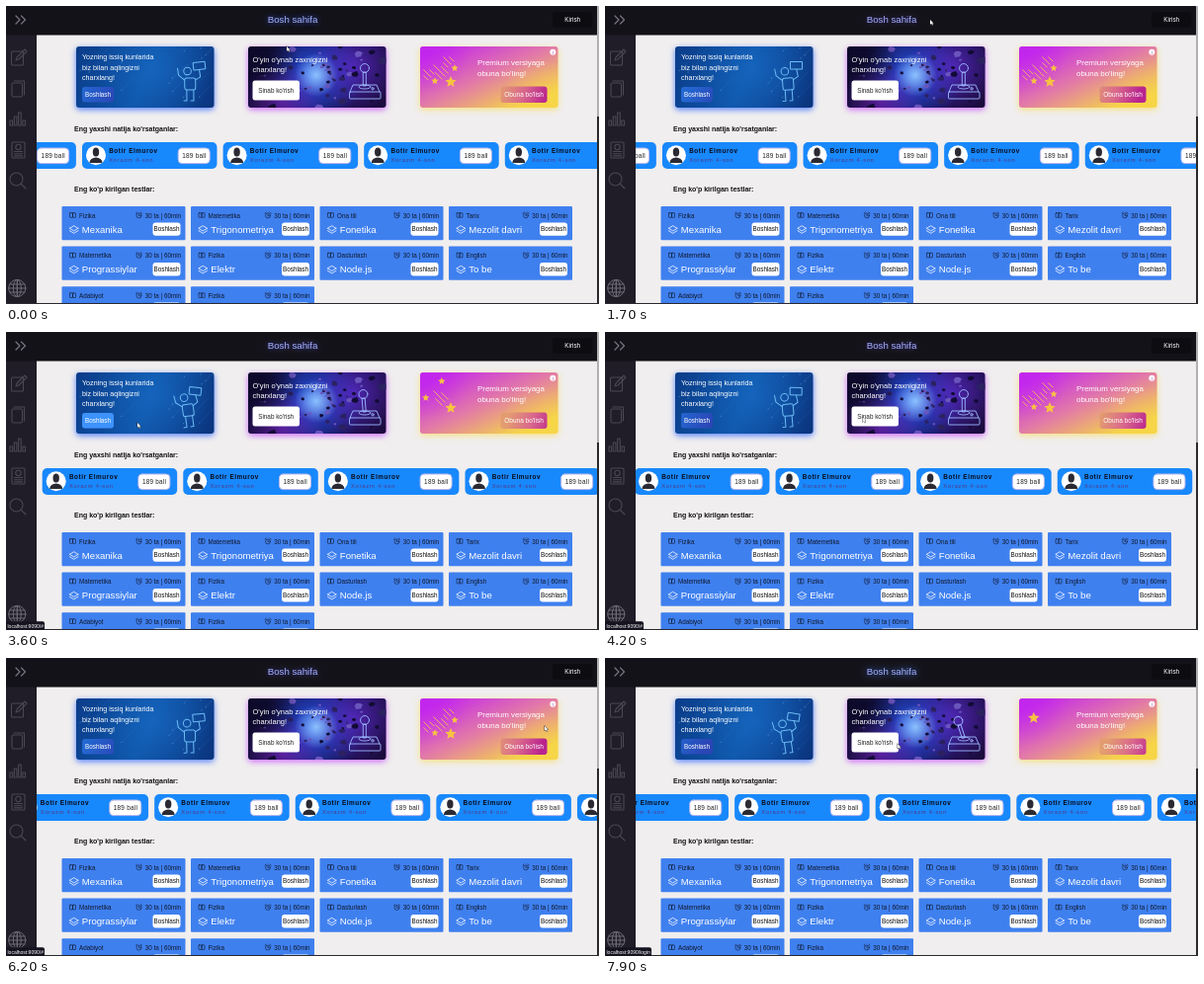
An HTML page with a canvas for the animation above (8000 ms loop, 600 by 302 pixels).

```html
<!DOCTYPE html>
<html lang="uz">
<head>
<meta charset="utf-8">
<title>Bosh sahifa</title>
<style>
html, body { margin: 0; width: 100%; height: 100%; overflow: hidden; background: #f0eeee; }
canvas { display: block; width: 600px; height: 302px; }
</style>
</head>
<body>
<canvas id="stage"></canvas>
<script>
const W = 600, H = 302, LOOP = 8000, STEP = 100, TAU = Math.PI * 2;
const SANS = '"Liberation Sans", Arial, sans-serif';
const dpr = window.devicePixelRatio || 1;
let g;

function surface(canvas) {
  canvas.width = W * dpr;
  canvas.height = H * dpr;
  const c = canvas.getContext('2d');
  c.scale(dpr, dpr);
  c.lineJoin = c.lineCap = 'round';
  return c;
}

// ---------- helpers ----------
const clamp = v => Math.max(0, Math.min(1, v));
const ease = v => { v = clamp(v); return v * v * (3 - 2 * v); };
const mix = (a, b, k) => a + (b - a) * k;
const wave = (t, peak, period) => Math.cos((t - peak) / period * TAU);
const during = (t, from, to) => t >= from && t < to;

function random(seed) {
  return () => (seed = (seed * 16807) % 2147483647) / 2147483647;
}

function pen(color, width) {
  g.strokeStyle = color;
  g.lineWidth = width;
}

function box(x, y, w, h, r, fill) {
  g.beginPath();
  g.roundRect(x, y, w, h, r);
  if (!fill) return g.stroke();
  g.fillStyle = fill;
  g.fill();
}

function oval(x, y, rx, ry, fill) {
  g.beginPath();
  g.ellipse(x, y, rx, ry, 0, 0, TAU);
  if (!fill) return g.stroke();
  g.fillStyle = fill;
  g.fill();
}

const circle = (x, y, r, fill) => oval(x, y, r, r, fill);

function path(...p) {
  g.beginPath();
  for (let i = 0; i < p.length; i += 2) g.lineTo(p[i], p[i + 1]);
  g.stroke();
}

// chevron centred on x, y; w and h may be negative to turn it
function vee(x, y, w, h) {
  path(x - w, y, x, y + h, x + w, y);
}

function text(s, x, y, size, color, opt = {}) {
  g.font = `${opt.bold ? 'bold ' : ''}${size}px ${SANS}`;
  g.textAlign = opt.align || 'left';
  g.letterSpacing = (opt.gap || 0) + 'px';
  g.fillStyle = color;
  g.fillText(s, x, y);
}

const label = (s, x, y, size, color) => text(s, x, y, size, color, { align: 'center' });

function lines(list, x, y, size, step) {
  list.forEach((s, i) => text(s, x, y + i * step, size, '#fff'));
}

function ramp(x, y, w, h, ...colors) {
  const r = g.createLinearGradient(x, y, x + w, y + h);
  colors.forEach((c, i) => r.addColorStop(i / (colors.length - 1), c));
  return r;
}

function glow(x, y, r, rgb, alpha) {
  const s = g.createRadialGradient(x, y, 0, x, y, r);
  s.addColorStop(0, `rgba(${rgb},${alpha})`);
  s.addColorStop(1, `rgba(${rgb},0)`);
  g.fillStyle = s;
  g.fillRect(x - r, y - r, r * 2, r * 2);
}

function at(x, y, angle, paint) {
  g.save();
  g.translate(x, y);
  g.rotate(angle);
  paint();
  g.restore();
}

// ---------- fixed page parts ----------
function banner(x, shade, fill, decorate) {
  g.save();
  g.shadowColor = shade;
  g.shadowBlur = 6 * dpr;
  g.shadowOffsetY = 2 * dpr;
  box(x, 41, 139.5, 62, 3, fill);
  g.restore();
  g.save();
  g.clip();
  decorate();
  g.restore();
}

function circuits() {
  const rnd = random(41);
  glow(150, 65, 60, '28,115,210', .5);
  pen('rgba(90,170,250,.2)', .5);
  for (let i = 0; i < 14; i++) {
    const x = 75 + rnd() * 130, y = 42 + rnd() * 60, d = 8 + rnd() * 18;
    path(x, y, x + d, y - d);
    circle(x, y, .7, 'rgba(120,190,255,.35)');
  }
}

function space() {
  const rnd = random(97);
  glow(310, 70, 52, '38,85,240', .95);
  glow(352, 62, 45, '100,45,215', .7);
  glow(280, 98, 42, '130,35,190', .6);
  glow(314, 70, 22, '150,205,255', .9);
  for (let i = 0; i < 55; i++) {
    const a = rnd() * TAU, d = 12 + rnd() * 65, r = 1 + d / 16 * rnd();
    g.fillStyle = ['#120b35', '#2b2160', '#6a55bd'][i % 3];
    g.beginPath();
    for (let n = 0; n < TAU; n += TAU / 6) {
      const m = r * (.6 + rnd() * .5);
      g.lineTo(314 + Math.cos(a) * d + Math.cos(n) * m * 1.3, 70 + Math.sin(a) * d * .6 + Math.sin(n) * m);
    }
    g.fill();
  }
  glow(262, 54, 34, '12,8,40', .75);
}

function sunset() {
  glow(425, 45, 45, '190,30,245', .5);
  glow(545, 105, 50, '250,215,65', .5);
}

function sidebar() {
  pen('#77747f', 1.2);
  for (const x of [14, 19.5]) path(x - 4, 10, x, 14, x - 4, 18);
  pen('#4a4754', 1.1);
  box(5.5, 46, 12, 14, 1);
  path(10, 55, 11, 52, 19, 44, 21, 46, 13, 54, 10, 55);
  box(6, 78, 10.5, 14, 1.5);
  path(8, 76, 18.5, 76, 18.5, 90);
  for (let i = 0; i < 4; i++) {
    const h = 5 + 4 * (i % 3);
    box(4 + i * 4.3, 121 - h, 2.6, h, 0);
  }
  box(6, 138, 13, 16, 1);
  circle(12.5, 143, 2.7);
  for (let y = 147.5; y < 153; y += 2.2) path(8.5, y, 16.5, y);
  circle(10.5, 175.5, 6.5);
  path(15, 180, 20, 185);
  pen('#6d6a76', 1);
  for (const r of [8.6, 4, .1]) oval(11.3, 286, r, 8.6);
  for (const d of [-4, 0, 4]) path(11.3 - 8.6 + Math.abs(d) / 4, 286 + d, 11.3 + 8.6 - Math.abs(d) / 4, 286 + d);
}

function testCard(x, y, subject, title) {
  const ink = '#10182c';
  box(x, y, 125, 34.2, 1, '#3f80ef');
  pen(ink, .6);
  for (const s of [-3, 0]) box(x + 11 + s, y + 6.7, 3, 4.6, .5);
  text(subject, x + 17.5, y + 11.6, 6.3, ink);
  circle(x + 78, y + 9.4, 2.5);
  path(x + 78, y + 8, x + 78, y + 9.6, x + 79.2, y + 9.6);
  for (const s of [-1, 1]) path(x + 78 + s * 3.1, y + 7.2, x + 78 + s * 1.8, y + 6);
  text('30 ta | 60min', x + 84.3, y + 11.6, 6.3, ink);
  pen('#fff', .75);
  vee(x + 12.2, y + 22.3, 4.3, -2.6);
  vee(x + 12.2, y + 22.3, 4.3, 2.6);
  vee(x + 12.2, y + 24.7, 4.3, 2.6);
  text(title, x + 20.3, y + 26.5, 9.6, '#fff');
  box(x + 92, y + 16.4, 28, 13.4, 3, '#fff');
  label('Boshlash', x + 106, y + 25.4, 6.35, '#111');
}

const TESTS = [
  ['Fizika', 'Mexanika'], ['Matemetika', 'Trigonometriya'], ['Ona tili', 'Fonetika'], ['Tarix', 'Mezolit davri'],
  ['Matemetika', 'Prograssiylar'], ['Fizika', 'Elektr'], ['Dasturlash', 'Node.js'], ['English', 'To be'],
  ['Adabiyot', ''], ['Fizika', '']
];

function page() {
  g.fillStyle = '#f0eeee';
  g.fillRect(0, 0, W, H);
  banner(71, 'rgba(30,90,255,.75)', ramp(71, 41, 140, 62, '#0b3d8a', '#0e55a8', '#0b337c'), circuits);
  banner(245, 'rgba(190,50,255,.7)', ramp(245, 41, 140, 62, '#0d0a28', '#1a1258', '#1c0b3c'), space);
  banner(419, 'rgba(250,215,60,.6)', ramp(460, 36, 35, 78, '#c62ee6', '#e279a8', '#f4d44a'), sunset);
  lines(['Yozning issiq kunlarida', 'biz bilan aqlingizni', 'charxlang!'], 77, 54.4, 7.15, 10.4);
  lines(["O'yin o'ynab zaxnigizni", 'charxlang!'], 249.5, 56.6, 7.5, 10.6);
  lines(['Premium versiyaga', "obuna bo'ling!"], 477, 59.8, 7.95, 10.7);
  circle(553.3, 46.8, 3, '#fff');
  label('i', 553.3, 48.6, 5, '#a050c0');
  text("Eng yaxshi natija ko'rsatganlar:", 69, 126.6, 7, '#111', { bold: true });
  text("Eng ko'p kirilgan testlar:", 69, 188.4, 7, '#111', { bold: true });
  TESTS.forEach(([s, title], i) => testCard(56.5 + (i % 4) * 130.5, 203 + Math.floor(i / 4) * 40.6, s, title));
  box(0, 0, 31, H, 0, '#201d28');
  box(0, 0, W, 29.5, 0, '#131218');
  box(553, 6, 40.5, 16, 3, '#0d0c11');
  label('Kirish', 573.2, 16.4, 6.3, '#fff');
  sidebar();
  box(598, 0, 2, H, 0, '#2a2a2c');
  box(598, 0, 2, 112, 0, '#b0b0b2');
  box(0, 301, W, 1, 0, '#2b2930');
}

// ---------- moving parts ----------
function rankCard(x) {
  box(x, 138, 136.5, 27, 5, '#1888fd');
  circle(x + 14, 151.3, 10, '#fff');
  oval(x + 14, 148, 3.2, 4.6, '#2b2a33');
  g.beginPath();
  g.ellipse(x + 14, 159, 6.5, 5.5, 0, Math.PI, TAU);
  g.fill();
  text('Botir Elmurov', x + 27.2, 148.8, 6.4, '#0a0a16', { bold: true, gap: .55 });
  text('Xorazm 4-son', x + 27.2, 157.8, 5.8, '#503a83', { gap: .75 });
  box(x + 97.2, 144, 32, 15.6, 4, '#fff');
  pen('#b9b6e8', 1);
  g.stroke();
  text('189 ball', x + 101.2, 154, 6.4, '#222', { gap: .25 });
}

function ranking(t) {
  g.save();
  g.beginPath();
  g.rect(31, 130, 567, 42);
  g.clip();
  for (let i = -1; i < 5; i++) rankCard(77 - t * .0112 + i * 142.6);
  g.restore();
}

function heading(t) {
  const k = .5 + .5 * wave(t, 2900, 2500);
  const picked = during(t, 600, 1700);
  if (picked) box(264.5, 7.8, 51.3 * clamp((t - 500) / 400), 13, 0, '#2a57c4');
  g.save();
  if (!picked) {
    g.shadowColor = `rgba(${mix(90, 60, k)},${mix(60, 120, k)},255,${mix(.5, 1, k)})`;
    g.shadowBlur = mix(4, 7, k) * dpr;
  }
  label('Bosh sahifa', 290, 17, 9.7, picked ? '#fff' : '#a5b0fa');
  g.restore();
}

function worker(t) {
  const k = .5 + .5 * wave(t, 3000, 5000);
  at(187, 96, mix(0, -.15, k), () => {
    pen('#6cbcf5', 1);
    circle(-3, -30, 3.8);
    box(-6, -23, 11, 12, 2);
    path(-6, -21, -12, -26, -13, -33);
    path(5, -21, 10, -24, 9, -31);
    for (const x of [-4, 3]) path(x, -11, x, 0, x - 3, 0);
    at(9, -35, mix(-.15, .3, k), () => box(-6, -4, 12, 7.5, .5));
  });
}

function joystick(t) {
  pen('#9db8ff', .9);
  at(363, 81, -.55 * Math.max(0, wave(t, 1060, 1400)) ** 2, () => {
    box(-1.3, -14, 2.6, 14, 0);
    circle(0, -18, 4.5);
  });
  oval(363, 82, 6, 2);
  path(348, 87, 351, 80, 375, 80, 378, 87);
  box(347.5, 87, 31.5, 7, 1);
  circle(371, 83.8, 1.2);
}

function star(x, y, r) {
  g.fillStyle = '#f8c440';
  g.beginPath();
  for (let i = 0; i < 10; i++) {
    const a = (i - 2.5) * TAU / 10, q = i % 2 ? r * .45 : r;
    g.lineTo(x + Math.cos(a) * q, y + Math.sin(a) * q);
  }
  g.fill();
}

// a star flies down to x, y and then shows its three trails
function shoot(p, x, y, r, delay) {
  const k = clamp((p - delay) / 350), fade = clamp((2300 - p) / 350);
  if (!k) return;
  const d = 27 * (1 - k), tail = clamp(k * 3 - 2);
  g.globalAlpha = fade;
  pen('#f2b95a', .9);
  for (let o = -1; o <= 1 && tail; o++) {
    const s = r * .8 + 1, e = s + r * (o ? 1.1 : 1.9) * tail;
    path(x - s + o * 3, y - s - o * 3, x - e + o * 3, y - e - o * 3);
  }
  star(x - d, y - d, r);
  g.globalAlpha = 1;
}

function shooting(t) {
  const p = (t + 1520) % 2320;
  shoot(p, 450, 77, 6, 0);
  shoot(p, 434, 76, 3.8, 250);
  shoot(p, 454, 63, 3.8, 300);
}

function buttons(t) {
  const sway = 10 * wave(t, 1100, 4400);
  box(77, 82, 32, 15.5, 3, ramp(77 + sway, 82, 32, 15, '#2468d2', '#2b45b5'));
  g.globalAlpha = ease((t - 3100) / 200) * ease((3850 - t) / 200);
  box(77, 82, 32, 15.5, 3, '#3d93fb');
  g.globalAlpha = 1;
  label('Boshlash', 93, 92.3, 6.35, '#fff');

  const asked = during(t, 4300, 5200);
  box(249.5, 75.5, 47.5, 20, 2.5, asked ? '#060508' : '#fff');
  if (asked) ['Qaytish', 'esdan', 'chiqmasin!'].forEach((s, i) => label(s, 273, 84.2 + i * 5, 6.2, '#fff'));
  else label("Sinab ko'rish", 273.2, 87.6, 6.3, '#222');

  box(500.5, 81.5, 47, 16.5, 3, ramp(500 - sway, 81, 47, 12, '#e39c70', '#d9688c', '#b9248f'));
  label("Obuna bo'lish", 524, 92.2, 6.5, '#fff');
}

function status(t) {
  const login = t >= 7100;
  if (!login && !during(t, 3200, 6600)) return;
  box(0, 293.3, login ? 47 : 39, 8.7, [0, 2, 0, 0], '#14131f');
  text(login ? 'localhost:9090/login' : 'localhost:9090/#', 1.5, 299.5, 5, '#fff');
}

// time, x, y
const MOUSE = [[0, 284, 41], [450, 263, 15], [900, 329, 14], [1700, 329, 14], [2500, 223, 24], [3200, 104, 90],
  [3600, 133, 92], [4300, 268, 86], [4900, 273, 83], [5800, 526, 90], [6200, 545, 69], [7100, 573, 13], [7900, 296, 87]];

function pointer(t) {
  const i = MOUSE.findLastIndex(m => m[0] <= t);
  const [t0, x0, y0] = MOUSE[i], [t1, x1, y1] = MOUSE[i + 1] || [LOOP, x0, y0];
  const k = ease((t - t0) / (t1 - t0));
  at(mix(x0, x1, k), mix(y0, y1, k), 0, () => {
    pen('#222', .8);
    path(0, 0, 0, 4.8, 1.2, 3.8, 2.2, 5.6, 2.9, 5.2, 2.1, 3.5, 3.5, 3.4, 0, 0);
    g.fillStyle = '#fff';
    g.fill();
    pen('#4a9cf0', 1);
    if (during(t, 900, 1500)) circle(4.2, 1, 1.8);
  });
}

// ---------- playback ----------
const back = document.createElement('canvas');
g = surface(back);
page();
g = surface(document.getElementById('stage'));

function draw(t) {
  g.drawImage(back, 0, 0, W, H);
  for (const part of [ranking, heading, worker, joystick, shooting, buttons, status, pointer]) part(t);
}

const start = performance.now();
let last = -1;
function tick() {
  const t = Math.floor(((performance.now() - start) % LOOP) / STEP) * STEP;
  if (t !== last) draw(last = t);
  requestAnimationFrame(tick);
}
tick();
</script>
</body>
</html>
```
